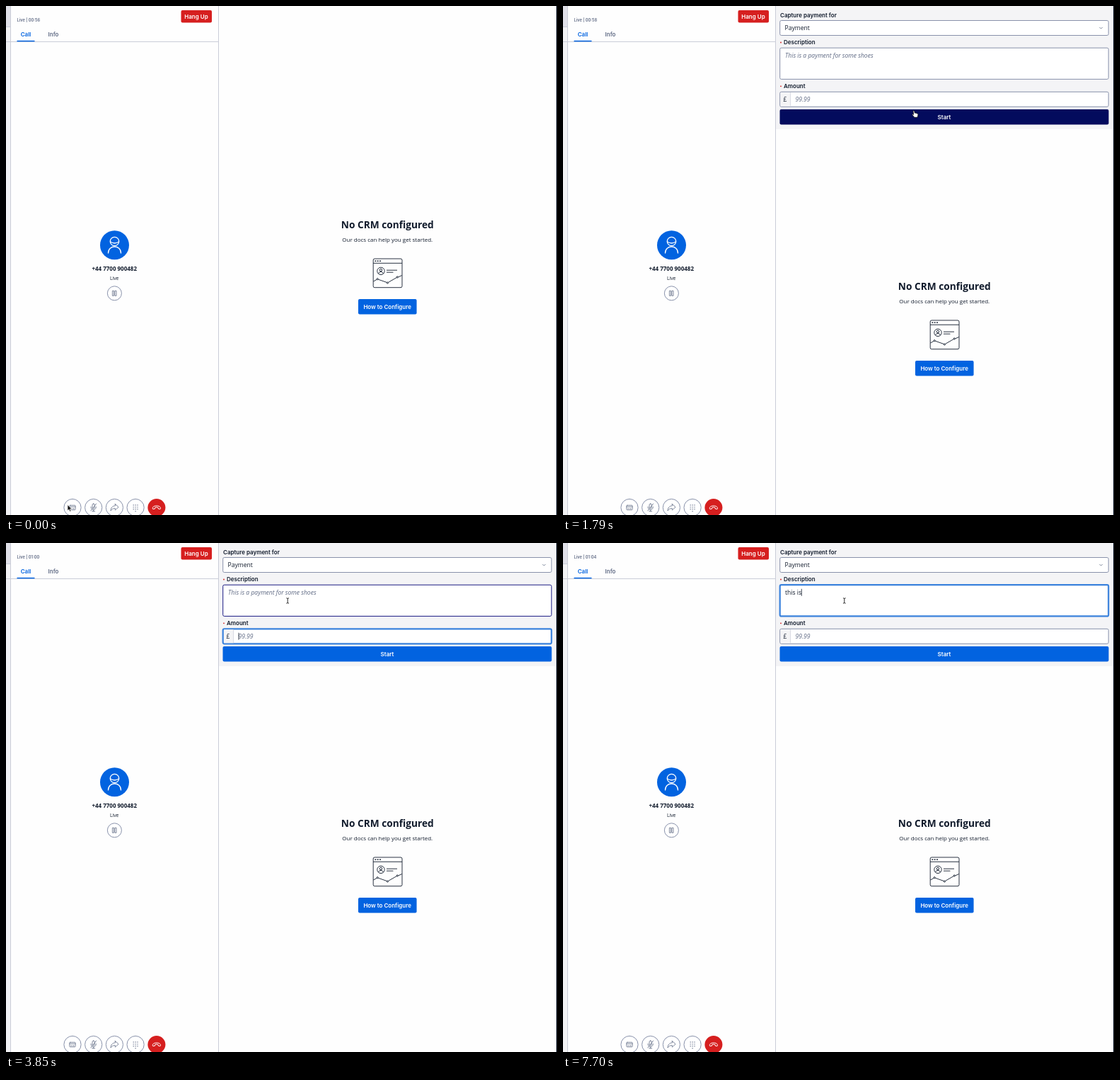
Write an HTML page that moves like this. It is 779 px wide and 719 px high and loops after 8000 ms.

```html
<!DOCTYPE html>
<html lang="en">
<head>
<meta charset="utf-8">
<title>Call payment</title>
<style>
  html, body { margin: 0; width: 100%; height: 100%; overflow: hidden; background: #fefefe; }
  svg { display: block; font-family: "Open Sans", sans-serif; font-size: 8px; fill: #121c2d; }
  text { white-space: pre; }
  .ui { font-family: Inter, sans-serif; font-weight: 600; }
  .mid { text-anchor: middle; }
  .white { fill: #fff; }
  .blue { fill: #0263e0; }
  .red { fill: #d61f1f; }
  .weak { fill: #606b85; }
  .input { font-size: 8.57px; }
  .hint { font-size: 8.57px; font-style: italic; fill: #606b85; }
  .box { fill: #fff; stroke: #8891aa; }
  .line { fill: none; stroke: #606b85; stroke-width: .8; stroke-linecap: round; stroke-linejoin: round; }
  .box.hover { stroke: #1a1a83; }
  .box.focus { stroke: #3b82dc; stroke-width: 2.2; }
  #start.hover { fill: #030b5d; }
  #card.hover { fill: #d9ebfb; stroke: #5c7aa8; }
  .pointer { fill: #fff; stroke: #111; stroke-width: .8; stroke-linejoin: round; }
</style>
</head>
<body>
<svg width="779" height="719" viewBox="0 0 779 719">
  <path fill="#f2f2f4" d="M0 0h6v719H0z"/>
  <path fill="#e0e0e8" d="M0 0h6v29.500H0z"/>
  <path fill="none" stroke="#cacdd8" d="M6.500 0V719M300.500 0V719M0 50.500H300M0 29.500H6"/>

  <!-- call panel -->
  <text class="ui weak" id="timer" x="15.500" y="22.400" font-size="5.71"></text>
  <rect class="red" x="247.500" y="6" width="43.500" height="17.500" rx="2"/>
  <text class="ui mid white" x="269" y="17.800">Hang Up</text>
  <text class="ui blue mid" x="28" y="43.100">Call</text>
  <text class="ui weak mid" x="67" y="43.100">Info</text>
  <path class="blue" d="M15.500 48.800h25v1.500h-25z"/>

  <circle class="blue" cx="153.500" cy="337.800" r="20.500"/>
  <g fill="none" stroke="#fff" stroke-width="1.300" stroke-linecap="round">
    <circle cx="153.500" cy="332.500" r="6.200"/>
    <path d="M147.500 333q6 4 12 0M144.500 349c0-12 18-12 18 0"/>
  </g>
  <text class="mid" x="153.200" y="373.900" font-weight="700">+44 7700 900482</text>
  <text class="mid" x="153.200" y="386.500" font-size="6.86">Live</text>
  <circle class="box" cx="153.400" cy="405.800" r="10"/>
  <path class="line" d="M150.800 402.300h1.700v7h-1.700zM154.300 402.300h1.700v7h-1.700z"/>

  <!-- call controls -->
  <g class="box">
    <circle id="card" cx="94" cy="708.500" r="12.100"/>
    <circle cx="123.700" cy="708.500" r="12.100"/>
    <circle cx="153.400" cy="708.500" r="12.100"/>
    <circle cx="183.100" cy="708.500" r="12.100"/>
  </g>
  <circle class="red" cx="212.900" cy="708.500" r="12.500"/>
  <g class="line">
    <rect x="89.800" y="705.300" width="8.400" height="6.500" rx="1"/>
    <path d="M90 707.300h8M91.500 710h1.500M94.500 710h2"/>
    <rect x="122" y="703.200" width="3.400" height="6.500" rx="1.700"/>
    <path d="M120 707.500c0 5.500 7.400 5.500 7.400 0M123.700 711.600v2.200M121.700 713.800h4M119.800 713l7.800-10"/>
    <path d="M154.300 703.500l4.800 4.300-4.800 4.300v-2.500c-3 0-4.700 1-6.300 3.500 .2-4.200 2.300-7 6.300-7.200z"/>
  </g>
  <g id="keys" class="weak"></g>
  <path fill="none" stroke="#fff" stroke-width="1" stroke-linejoin="round" d="M207.300 709.800c-.7-5 11.900-5 11.200 0l-.5.900-2.700-.5-.4-1.800q-2-.7-4 0l-.4 1.800-2.700.5z"/>

  <!-- empty CRM panel -->
  <g id="crm">
    <text class="mid" x="539.300" y="314" font-size="13.71" font-weight="700">No CRM configured</text>
    <text class="mid" x="539.300" y="333.300">Our docs can help you get started.</text>
    <g fill="none" stroke="#121c2d" stroke-width=".9">
      <rect x="519.200" y="357" width="40.800" height="40.700" rx="2"/>
      <path d="M519 363.300h41M538 373.200h15M538 376.200h9.500M519.500 389l4.700-2.600M526.200 386.200l12 4.200M540.600 390.300l11.500-6.600M554.300 383l5.500-2.500"/>
      <circle cx="530" cy="374.400" r="5.200"/>
      <circle cx="530" cy="373" r="1.700"/>
      <path d="M526.700 378c.6-3.500 6-3.500 6.600 0"/>
      <circle cx="525.200" cy="385.700" r="1.100"/>
      <circle cx="539.400" cy="391" r="1.100"/>
      <circle cx="553.200" cy="383" r="1.100"/>
      <path stroke-width="1.500" stroke-dasharray="1.800 1.500" d="M521.500 360.200h9"/>
    </g>
    <rect class="blue" x="498" y="414" width="82.600" height="21.500" rx="2"/>
    <text class="ui mid white" x="539.200" y="427.700">How to Configure</text>
  </g>

  <!-- payment form -->
  <g id="form">
    <path fill="#f4f4f6" d="M301 0h477v174H301z"/>
    <text class="ui" x="307" y="15.600">Capture payment for</text>
    <rect class="box" x="306.700" y="20.500" width="464.500" height="21" rx="2"/>
    <text class="input" x="313.500" y="34">Payment</text>
    <path class="line" stroke-width="1" d="M758.700 30.200l1.900 1.900 1.900-1.900"/>
    <circle class="red" cx="308" cy="51.500" r=".9"/>
    <text class="ui" x="312" y="54.300">Description</text>
    <rect class="box" id="desc" x="306.700" y="59.200" width="464.500" height="44.200" rx="2"/>
    <text class="hint" id="hint" x="314" y="73">This is a payment for some shoes</text>
    <text class="input" id="typed" x="314" y="73"></text>
    <circle class="red" cx="308" cy="113.300" r=".9"/>
    <text class="ui" x="312" y="116.200">Amount</text>
    <rect class="box" id="amount" x="306.700" y="121.300" width="464.500" height="21" rx="2"/>
    <path fill="#f4f4f6" d="M308 122.300h13.500v19H308z"/>
    <path fill="#cacdd8" d="M321.200 122.300h.7v19h-.7z"/>
    <text class="input mid" x="314" y="134.900">£</text>
    <text class="hint" x="328.500" y="134.900">99.99</text>
    <rect class="blue" id="start" x="306.500" y="146" width="465" height="21.500" rx="2"/>
    <text class="ui mid white" x="539" y="159.700">Start</text>
    <rect id="caret" width=".8" height="10"/>
  </g>

  <path d="M778 0h1v719h-1z"/>

  <!-- pointers, hot spot at the origin -->
  <path id="arrow" fill="#111" stroke="#fff" stroke-width=".7" d="M0 0V8.500L2 6.700 3.400 9.800 4.900 9.100 3.500 6.200H6.200z"/>
  <path id="hand" class="pointer" d="M-1 .6C-1-.5.600-.5.800.6L1.300 3.200C2 2.600 2.900 2.900 3 3.600 3.700 3.100 4.500 3.400 4.600 4.200 5.400 3.900 6 4.400 6 5.200L5.700 7.200 5 9.300H.7C-.2 7.800-1.700 6.600-2.200 5.400-2.100 4.600-1 4.700-.3 5.500z"/>
  <path id="beam" fill="none" stroke="#111" stroke-width=".9" d="M-1.800-3.700Q0-3.700 0-2.700 0-3.700 1.800-3.700M0-2.700V2.700M-1.800 3.700Q0 3.700 0 2.700 0 3.700 1.800 3.700"/>
</svg>
<script>
const LOOP = 8000, STEPS = 54;
const $ = id => document.getElementById(id);
const show = (id, on) => $(id).style.display = on ? "" : "none";
const within = (s, from, to) => s >= from && s < to;
const passed = (list, s) => list.filter(at => at <= s).length;

const ticks = [2, 9, 16, 22, 29, 35, 42, 49];
const keystrokes = [41, 42, 43, 45, 47, 50, 52];
const route = [ // step, x, y
  [0, 87, 704.5], [4, 87, 704.5], [6, 90.5, 709], [9, 90.5, 709], [12, 496, 148],
  [15, 455, 156], [17, 440, 150], [19, 412, 88], [20, 409, 96], [21, 405, 112],
  [23, 402, 132], [24, 401, 132], [26, 398.2, 81.5], [27, 397.8, 81.5], [STEPS, 397.8, 81.5]
];

function pointerAt(s) {
  const i = route.findIndex(p => p[0] > s);
  const [s0, x0, y0] = route[i - 1], [s1, x1, y1] = route[i];
  const k = (s - s0) / (s1 - s0);
  return [x0 + (x1 - x0) * k, y0 + (y1 - y0) * k];
}

for (let i = 0; i < 9; i++) {
  const x = 180.2 + i % 3 * 2.9, y = 705 + Math.floor(i / 3) * 2.9;
  $("keys").innerHTML += `<circle cx="${x}" cy="${y}" r=".7"/>`;
}
$("keys").innerHTML += '<circle cx="183.100" cy="713.700" r=".7"/>';

function draw(time) {
  const s = Math.floor((time % LOOP + 5) / LOOP * STEPS) % STEPS;
  const seconds = 56 + passed(ticks, s);
  const two = n => String(n).padStart(2, "0");
  $("timer").textContent = `Live | ${two(Math.floor(seconds / 60))}:${two(seconds % 60)}`;

  const open = s >= 10;
  show("form", open);
  $("crm").setAttribute("transform", `translate(0 ${open ? 87 : 0})`);
  $("card").classList.toggle("hover", within(s, 5, 10));
  $("start").classList.toggle("hover", within(s, 12, 18));

  const inAmount = within(s, 24, 27), inDesc = s >= 27;
  $("amount").classList.toggle("focus", inAmount);
  $("desc").classList.toggle("hover", within(s, 19, 27));
  $("desc").classList.toggle("focus", inDesc);

  const typed = "this is".slice(0, passed(keystrokes, s));
  $("typed").textContent = typed;
  show("hint", !typed);
  const end = typed ? $("typed").getComputedTextLength() : 0;
  $("caret").setAttribute("x", inAmount ? 328.6 : 313.8 + end);
  $("caret").setAttribute("y", inAmount ? 126.8 : 64.8);
  show("caret", inAmount || within(s, 27, 30) || within(s, 33, 37) || s >= 40);

  const kind = s < 6 ? "arrow" : s < 24 ? "hand" : "beam";
  for (const id of ["arrow", "hand", "beam"]) show(id, id === kind);
  $(kind).setAttribute("transform", `translate(${pointerAt(s)})`);
}

const begin = performance.now();
(function frame() {
  draw(performance.now() - begin);
  requestAnimationFrame(frame);
})();
</script>
</body>
</html>
```
